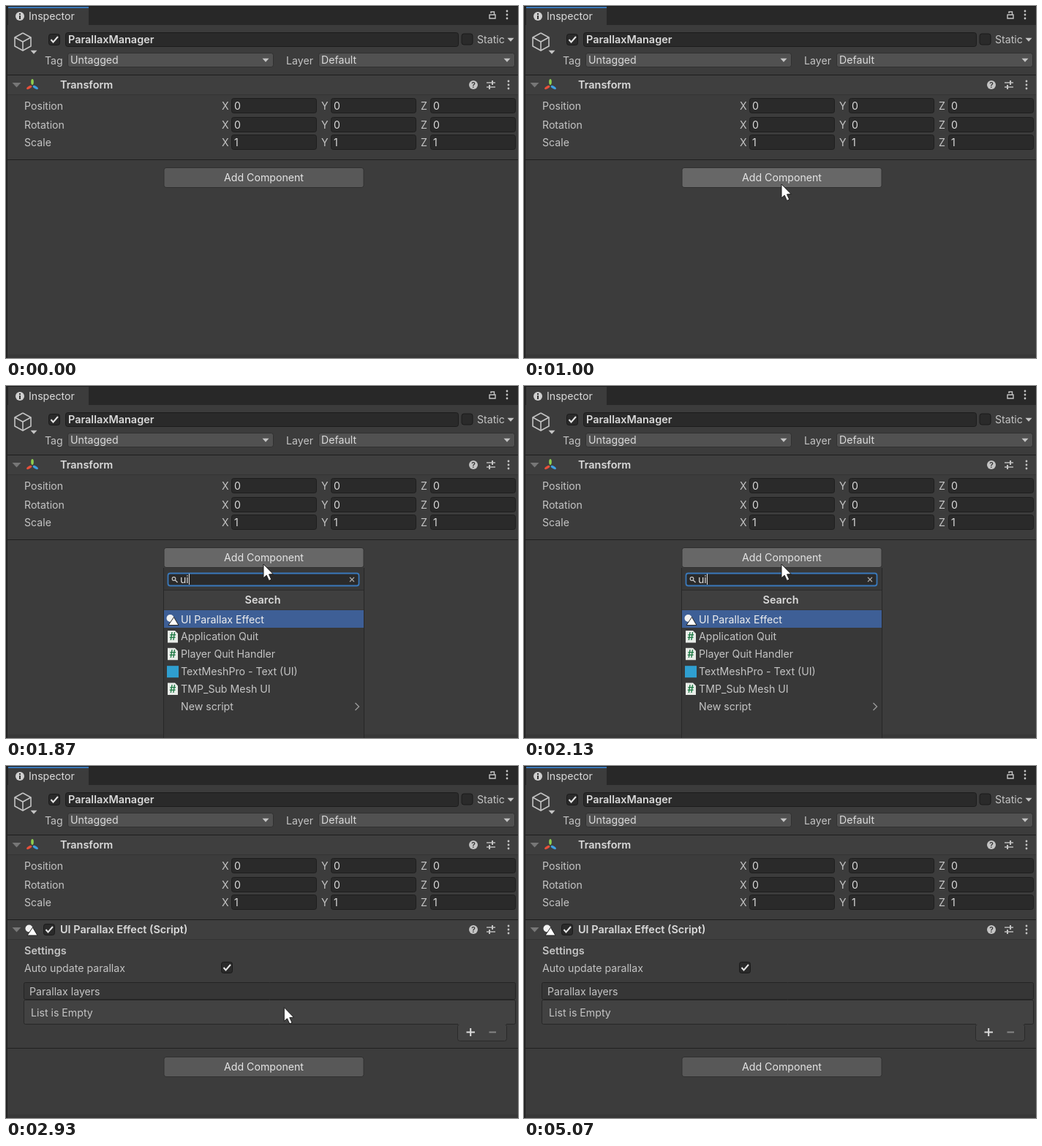
Animation of 700 by 482 pixels, one loop 5140 ms. Source, as an HTML page with a canvas:

```html
<!DOCTYPE html>
<html lang="en">
<head>
<meta charset="utf-8">
<title>Adding a component</title>
<style>
html, body { margin: 0; width: 100%; height: 100%; overflow: hidden; background: #3c3c3c; }
canvas { display: block; }
</style>
</head>
<body>
<canvas id="stage" width="700" height="482"></canvas>
<script>
const LOOP = 5140, OPEN = 1070, TYPE_U = 1730, TYPE_I = 1870, ADDED = 2470;
const LABEL = '#c4c4c4', BRIGHT = '#dadada', FIELD = '#2a2a2a', DARK = '#202020', BLUE = '#3a79bb', SELECT = '#3e5f96';
const c = document.getElementById('stage').getContext('2d');

// Pointer keys: time, x, y of the tip.
const enter = [[50, 402, -26], [200, 411, 150], [400, 408, 405], [560, 390, 370], [740, 364, 275], [930, 352, 244]];
const leave = [[2700, 352, 244], [2930, 380, 330], [3200, 452, 484]];

function rect(x, y, w, h, fill) {
  c.fillStyle = fill;
  c.fillRect(x, y, w, h);
}

function box(x, y, w, h, fill, stroke, r = 3, width = 1) {
  c.beginPath();
  c.roundRect(x + .5, y + .5, w - 1, h - 1, r);
  c.fillStyle = fill;
  c.fill();
  if (stroke) { c.strokeStyle = stroke; c.lineWidth = width; c.stroke(); }
}

// Text is placed by the middle of its capitals.
function text(s, x, mid, { color = LABEL, bold = false, align = 'left', size = 14.15 } = {}) {
  c.font = `${bold ? 600 : 400} ${bold ? size + .3 : size}px Inter, sans-serif`;
  c.textAlign = align;
  c.fillStyle = color;
  c.fillText(s, x, mid + size * .36);
}

function shape(points, fill) {
  c.beginPath();
  points.forEach(([x, y]) => c.lineTo(x, y));
  c.closePath();
  c.fillStyle = fill;
  c.fill();
}

function line(points, color = LABEL, width = 1.4) {
  c.beginPath();
  points.forEach(([x, y], i) => i ? c.lineTo(x, y) : c.moveTo(x, y));
  c.strokeStyle = color;
  c.lineWidth = width;
  c.stroke();
}

function disc(x, y, r, fill) {
  c.beginPath();
  c.arc(x, y, r, 0, 7);
  c.fillStyle = fill;
  c.fill();
}

const down = (x, y, r = 4.5, color = LABEL) => shape([[x - r, y - r / 2], [x + r, y - r / 2], [x, y + r / 2 + .5]], color);
const dots = (x, y) => [-5, 0, 5].forEach(d => disc(x, y + d, 1.4, LABEL));
const chevron = (x, y) => line([[x - 2.5, y - 5], [x + 2.5, y], [x - 2.5, y + 5]], '#999');

function check(x, y, on) {
  box(x - 8, y - 8, 16, 16, FIELD, '#1a1a1a');
  if (on) line([[x - 4.5, y], [x - 1.5, y + 3.5], [x + 5, y - 4]], '#e6e6e6', 2);
}

function dropdown(x, w, value) {
  box(x, 64, w, 20, '#515151', '#303030');
  text(value, x + 4, 74, { color: BRIGHT });
  down(x + w - 11, 74);
}

function gizmo(x, y) {
  [['#8fd14f', 0], ['#3f9fe0', 2.1], ['#e8503a', -2.1]].forEach(([color, turn]) => {
    c.save();
    c.translate(x, y);
    c.rotate(turn);
    c.beginPath();
    c.ellipse(0, -5, 1.8, 4, 0, 0, 7);
    c.fillStyle = color;
    c.fill();
    c.restore();
  });
}

function shapesIcon(x, y) {
  disc(x - 2.5, y - 1.5, 5, '#f2f2f2');
  const tri = [[x + 2.5, y - 3], [x + 9, y + 8], [x - 5, y + 8]];
  shape(tri, '#fff');
  line([...tri, tri[0]], '#252525', 1);
}

function scriptIcon(x, y) {
  shape([[x - 7, y - 8.5], [x + 3, y - 8.5], [x + 7, y - 4.5], [x + 7, y + 8], [x - 7, y + 8]], '#e8ece8');
  text('#', x, y, { color: '#1f7a45', bold: true, align: 'center', size: 13.5 });
}

function cube(x, y) {
  line([[x, y - 12], [x + 11, y - 6], [x + 11, y + 6], [x, y + 12], [x - 11, y + 6], [x - 11, y - 6], [x, y - 12]], LABEL, 1.6);
  line([[x - 11, y - 6], [x, y], [x + 11, y - 6]], LABEL, 1.6);
  line([[x, y], [x, y + 12]], LABEL, 1.6);
}

function titleBar(y, name) {
  rect(2, y - 14, 698, 1, '#1d1d1d');
  rect(2, y - 13, 698, 26, '#3f3f3f');
  rect(2, y + 13, 698, 1, '#343434');
  down(14.5, y, 6, '#777');
  text(name, 74, y, { color: BRIGHT, bold: true });
  disc(639, y, 6, LABEL);
  text('?', 639, y, { color: '#333', bold: true, align: 'center', size: 10 });
  line([[657, y - 3], [669, y - 3]]);
  line([[657, y + 3], [669, y + 3]]);
  line([[665, y - 6], [665, y]], LABEL, 2);
  line([[661, y], [661, y + 6]], LABEL, 2);
  dots(687, y);
}

function header(focused) {
  rect(0, 0, 700, 482, '#3c3c3c');
  rect(0, 0, 700, 26, '#282828');
  rect(3, 1, 110, 25, '#3c3c3c');
  rect(0, 0, 700, 1, '#1c1c1c');
  if (focused) rect(3, 1, 110, 2, BLUE);
  disc(19, 14, 6, '#d0d0d0');
  rect(18, 10, 2, 2, '#333');
  rect(18, 13, 2, 5, '#333');
  text('Inspector', 31, 14, { color: BRIGHT });
  line([[661, 12], [661, 17], [669, 17], [669, 12], [660.5, 12]]);
  line([[667.5, 12], [667.5, 8], [663, 8], [663, 10]]);
  dots(685, 12);

  cube(23, 49);
  down(38, 63);
  check(66, 46, true);
  box(81, 36, 538, 20, FIELD, '#1c1c1c');
  text('ParallaxManager', 85, 46, { color: BRIGHT, bold: true });
  check(630.5, 45.5, false);
  text('Static', 644, 46);
  down(690, 46);
  text('Tag', 53, 75);
  dropdown(84, 282, 'Untagged');
  text('Layer', 383, 75);
  dropdown(427, 269, 'Default');
}

function transform() {
  titleBar(108, 'Transform');
  gizmo(36, 109);
  [['Position', 137, 0], ['Rotation', 163, 0], ['Scale', 187, 1]].forEach(([name, y, value]) => {
    text(name, 25, y);
    ['X', 'Y', 'Z'].forEach((axis, i) => {
      const x = 308 + i * 136;
      text(axis, x - 13, y);
      box(x, y - 11, 117, 21, FIELD, '#1e1e1e');
      text(value, x + 4, y, { color: BRIGHT });
    });
  });
  rect(2, 210, 698, 1, DARK);
}

function effect() {
  titleBar(224, 'UI Parallax Effect (Script)');
  shapesIcon(34, 224);
  check(59, 224, true);
  text('Settings', 25, 253, { bold: true });
  text('Auto update parallax', 25, 277);
  check(302, 276, true);
  box(24, 320, 673, 34, '#424242', '#272727', 2);
  box(24, 296, 673, 24, '#363636', '#242424', 2);
  text('Parallax layers', 32, 309);
  text('List is Empty', 34, 338);
  box(617, 353, 68, 24, '#424242', '#2a2a2a');
  rect(618, 352, 66, 2, '#424242');
  line([[629.5, 364.5], [641, 364.5]], '#ddd', 2);
  line([[635.2, 359], [635.2, 370]], '#ddd', 2);
  line([[660.5, 364.5], [670, 364.5]], '#858585', 2);
  rect(2, 386, 698, 1, DARK);
}

function addButton(y, [px, py]) {
  const hover = px >= 216 && px < 489 && py >= y && py < y + 28;
  box(215.5, y, 274, 28, hover ? '#676767' : '#585858', '#303030');
  text('Add Component', 352.5, y + 14, { color: '#e4e4e4', align: 'center' });
}

function popup(query) {
  rect(215, 249, 275, 233, '#272727');
  rect(216, 249, 273, 233, '#383838');
  rect(216, 280, 273, 26, '#3f3f3f');
  rect(216, 279, 273, 1, '#2b2b2b');
  box(221, 256, 262, 18, FIELD, BLUE, 3, 1.8);
  c.beginPath();
  c.arc(229.5, 264, 2.3, 0, 7);
  c.strokeStyle = LABEL;
  c.lineWidth = 1.2;
  c.stroke();
  line([[231.2, 265.7], [234.5, 269]]);
  text(query, 238, 265, { color: BRIGHT });
  rect(Math.round(238 + c.measureText(query).width), 257, 1, 15, '#ddd');
  text(query ? 'Search' : 'Component', query ? 351 : 352, 293, { color: BRIGHT, bold: true, align: 'center' });

  const row = i => 319.5 + i * 23.9;
  const pick = query ? 0 : 7;
  rect(216, Math.floor(row(pick) - 12.5), query ? 273 : 258, 24, SELECT);
  const names = query
    ? ['UI Parallax Effect', 'Application Quit', 'Player Quit Handler', 'TextMeshPro - Text (UI)', 'TMP_Sub Mesh UI', 'New script']
    : ['Analytics', 'AR', 'Audio', 'Effects', 'Event', 'Layout', 'Mesh', 'Miscellaneous'];
  names.forEach((name, i) => text(name, 239, row(i), { color: i === pick ? '#eee' : LABEL }));

  if (query) {
    line([[470, 262], [476, 268]], '#a8a8a8', 1.2);
    line([[476, 262], [470, 268]], '#a8a8a8', 1.2);
    shapesIcon(227, row(0));
    [1, 2, 4].forEach(i => scriptIcon(228, row(i)));
    rect(220, row(3) - 8, 16, 16, '#2f9fd0');
    chevron(480, row(5));
  } else {
    names.forEach((_, i) => chevron(464, row(i)));
    rect(474, 307, 15, 175, '#343434');
    shape([[477, 318.5], [485, 318.5], [481, 313.5]], LABEL);
    box(475, 325, 12, 180, '#5f5f5f');
  }
}

function pointerAt(t) {
  const keys = t < 2700 ? enter : leave;
  if (t < keys[0][0]) return [-99, -99];
  for (let i = 1; i < keys.length; i++) {
    const [t0, x0, y0] = keys[i - 1], [t1, x1, y1] = keys[i];
    if (t < t1) {
      const k = (t - t0) / (t1 - t0);
      return [x0 + (x1 - x0) * k, y0 + (y1 - y0) * k];
    }
  }
  return keys === enter ? [352, 244] : [-99, -99];
}

function pointer([x, y]) {
  const tip = [[0, 0], [0, 19], [4.2, 15.2], [7.5, 22.5], [10.8, 21], [7.5, 13.9], [13.2, 13.6]].map(([a, b]) => [x + a, y + b]);
  shape(tip, '#fff');
  line([...tip, tip[0]], '#1c1c1c', 1);
}

function draw(t) {
  const open = t >= OPEN && t < ADDED, added = t >= ADDED, at = pointerAt(t);
  header(!open);
  transform();
  if (added) effect();
  addButton(added ? 398 : 221, at);
  rect(0, 477, 700, 5, '#373737');
  rect(0, 0, 2, 482, '#232323');
  if (open) popup(t < TYPE_U ? '' : t < TYPE_I ? 'u' : 'ui');
  pointer(at);
}

const start = performance.now();
function tick() {
  draw((performance.now() - start) % LOOP);
  requestAnimationFrame(tick);
}
tick();
</script>
</body>
</html>
```
